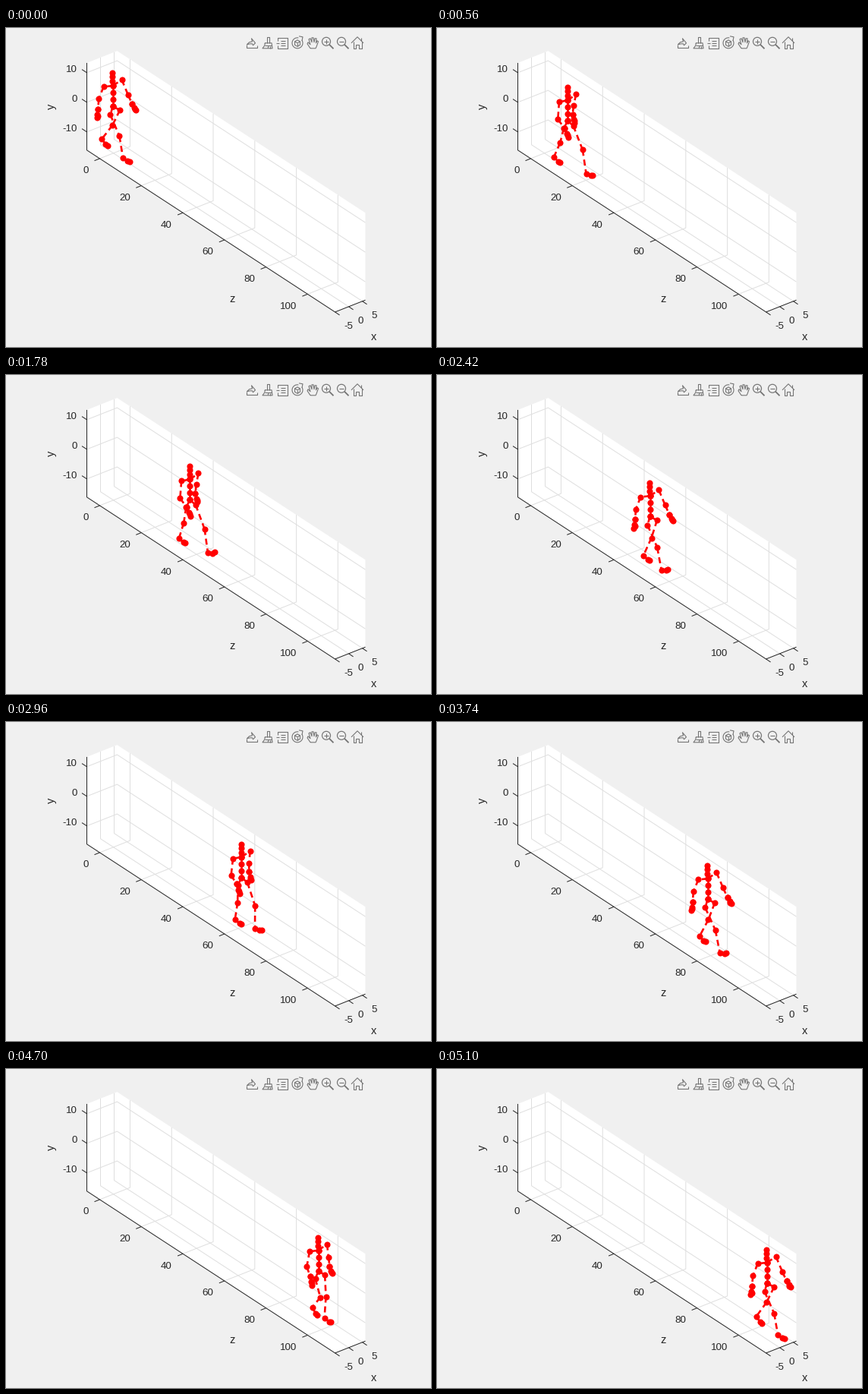
Animation, 560 px wide and 420 px high, one loop 5.12 s. Source, as a matplotlib script:

```python
import numpy as np
import matplotlib.pyplot as plt
from matplotlib.animation import FuncAnimation
from matplotlib.collections import LineCollection
from matplotlib.patches import Circle, Polygon

FRAMES, INTERVAL, STRIDE = 256, 20, 64
PX = 72 / 70  # points per pixel
INK, ICON = "#262626", "#757575"

plt.rcParams["font.family"] = "Liberation Sans"
fig = plt.figure(figsize=(8, 6), dpi=70, facecolor="#f0f0f0")
ax = fig.add_axes([0, 0, 1, 1])
ax.set_xlim(0.5, 560.5)
ax.set_ylim(420.2, 0.2)
ax.axis("off")


# ---------- 3-D box in screen space ----------
Y_MIN, Y_MAX = -16.15, 13.3
X_MIN, X_MAX = -5, 6.1
Z_MIN, Z_MAX = -6.2, 113.2


def project(x, y, z):
    return (142 + 3.6 * x + 2.739 * z, 102 - 1.42 * x - 3.9 * y + 1.785 * z)


def segments(segs, color, width):
    ax.add_collection(LineCollection(segs, colors=color, linewidths=width * PX))


def label(x, y, text, size=13.33, **kw):
    ax.text(x, y, text, fontsize=size * PX, color=INK, va="baseline", **kw)


outline = [(X_MIN, Y_MAX, Z_MIN), (X_MAX, Y_MAX, Z_MIN), (X_MAX, Y_MAX, Z_MAX),
           (X_MAX, Y_MIN, Z_MAX), (X_MIN, Y_MIN, Z_MAX), (X_MIN, Y_MIN, Z_MIN)]
ax.add_patch(Polygon([project(*p) for p in outline], fc="white", ec="none"))

grid, ticks = [], []


def tick(point, dx, dy):
    ticks.append([point, (point[0] + dx, point[1] + dy)])


for z in range(0, 101, 20):
    a = project(X_MIN, Y_MIN, z)
    grid.append([a, project(X_MAX, Y_MIN, z), project(X_MAX, Y_MAX, z)])
    tick(a, -7, 2.8)
    label(a[0] - 14.5, a[1] + 19.5, str(z), ha="right")
for y in (-10, 0, 10):
    a = project(X_MIN, y, Z_MIN)
    grid.append([a, project(X_MAX, y, Z_MIN), project(X_MAX, y, Z_MAX)])
    tick(a, -6.5, -4.2)
    label(a[0] - 13, a[1] - 1.3, str(y), ha="right")
for x in (-5, 0, 5):
    a = project(x, Y_MIN, Z_MAX)
    if x > X_MIN:
        grid.append([project(x, Y_MAX, Z_MIN), project(x, Y_MIN, Z_MIN), a])
    tick(a, 6, 4)
    label(a[0] + 11.5, a[1] + 22, str(x), ha="left")

segments(grid, "#dfdfdf", 1)
edges = [[project(X_MIN, Y_MAX, Z_MIN), project(X_MIN, Y_MIN, Z_MIN),
          project(X_MIN, Y_MIN, Z_MAX), project(X_MAX, Y_MIN, Z_MAX)]]
segments(edges + ticks, INK, 1)

label(298.5, 361, "z", 14.67, ha="center")
label(485.5, 411, "x", 14.67, ha="center")
label(64, 103.5, "y", 14.67, ha="center", rotation=90, rotation_mode="anchor")


# ---------- toolbar ----------
def stroke(cx, *paths, width=1.1):
    segments([[(cx + x, 20 + y) for x, y in p] for p in paths], ICON, width)


stroke(324, [(-7, 2), (-7, 6), (7, 6), (7, 3)],
       [(-6, 2), (-3, -1), (1, -2), (0, -6), (5, 0), (2, 3), (1, 1), (-2, 1), (-6, 2)])
stroke(345.5, [(-1, 0), (-1, -8), (2, -8), (2, 0)],
       [(-4, 0), (5, 0), (6, 7), (-7, 7), (-4, 3), (-4, 0)],
       [(-4, 3), (5, 3)], [(0, 7), (1, 4)], [(3, 7), (3, 4)])
stroke(364.5, [(-6, -3), (-6, -7), (7, -7), (7, 7), (-6, 7), (-6, 3)], [(-8, 0), (-4, 0)],
       *([(-2, y), (4, y)] for y in (-3, 0, 3)))
turn = np.linspace(-0.6, 4.9, 30)
stroke(384.5, list(zip(7 * np.cos(turn), 7 * np.sin(turn))),
       [(2, -9), (7, -8), (6, -3)],
       [(0, -4), (3.5, -2), (3.5, 2.5), (0, 4.5), (-3.5, 2.5), (-3.5, -2), (0, -4)],
       [(-3.5, -2), (0, 0), (3.5, -2)], [(0, 0), (0, 4.5)])
stroke(404.5, [(-3, 7), (-7, 1), (-6, -1), (-3, 2), (-5, -5), (-3, -6), (-1, -1),
               (-1, -7), (1, -7), (2, -1), (3, -6), (5, -6), (4.5, 0), (6, -3),
               (7.5, -2), (5, 5), (4, 7), (-3, 7)])
for cx, plus in ((424.5, True), (444.5, False)):
    ax.add_patch(Circle((cx - 2, 18), 5.5, fc="none", ec=ICON, lw=1.2 * PX))
    stroke(cx, [(2, 2), (7.5, 7.5)], width=1.8)
    stroke(cx, [(-5, -2), (1, -2)])
    if plus:
        stroke(cx, [(-2, -5), (-2, 1)])
stroke(463.5, [(-8, 0), (0, -8), (8, 0)],
       [(-5.5, -2), (-5.5, 7), (-2, 7), (-2, 2), (2, 2), (2, 7), (5.5, 7), (5.5, -2)],
       [(5, -3), (5, -7)])


# ---------- walk cycle ----------
SPEED = np.array([1.153, 0.702])
SLOPE = SPEED[1] / SPEED[0]
step = np.arange(FRAMES)
turn = 2 * np.pi / STRIDE


def wave(peak, harmonic=1):
    return np.cos(harmonic * turn * (step - peak))


def bump(u, centre, width):
    d = (u - centre + STRIDE / 2) % STRIDE - STRIDE / 2
    return np.exp(-(d / width) ** 2)


def ease(t):
    t = np.clip(t, 0, 1)
    return t * t * (3 - 2 * t)


def points(x, y):
    return np.stack(np.broadcast_arrays(x, y), axis=-1)


track = np.array([141.5, 103]) + step[:, None] * SPEED
sway = -0.6 + 0.7 * wave(55)
bob = -1.1 + 1.4 * wave(1, 2) + 0.5 * wave(16)
root = track + points(sway, bob)


def leg(side):
    """Hip, knee, ankle, foot and toe; side is -1 (near) or 1 (far)."""
    u = (step + 17 + 16 * side) % STRIDE  # steps since the foot went flat
    twist = wave(58)
    hip = root + points(2.15 + 6.25 * side + 0.9 * twist, 8.1 - (2.4 + 0.7 * twist) * side)

    # The foot stays planted, then swings one stride ahead.
    x = 17.8 + 3.6 * side + SPEED[0] * (STRIDE * ease((u - 29.5) / 34.5) - u)
    y = 57.6 - 2.2 * side + 0.609 * x - 11 * bump(u, 40.5, 7)
    ankle = track + points(x, y)

    push, strike = bump(u, 39, 8), bump(u, 57, 5)
    pitch = push - strike
    foot = ankle + points(6 - 2.3 * push, 4.8 + 4.5 * pitch)
    toe = foot + points(2.7 - 0.6 * push, 0.8 + 2.4 * pitch)

    bend = points(1.6 + 7.5 * bump(u, 46, 7.5) + 2.2 * bump(u, 63, 8),
                  6 * bump(u, 42, 7))
    knee = (hip + ankle) / 2 + bend
    return np.stack([hip, knee, ankle, foot, toe], axis=1)


def arm(shoulder, elbow, wrist, tip):
    """Each joint is its middle position plus how far it swings."""
    swing = wave(60.5)[:, None]
    shoulder, elbow, wrist, tip = (
        root + np.array(j[:2]) + swing * np.array(j[2:])
        for j in (shoulder, elbow, wrist, tip))
    hand = wrist + 0.6 * (tip - wrist)
    thumb = hand + np.array([0.8, 2])
    return (np.stack([spine[:, 3], shoulder, elbow, wrist, hand, tip], axis=1),
            np.stack([wrist, thumb], axis=1))


heights = np.array([0, 9, 18, 27, 33, 39, 44])
spine = root[:, None] + np.stack([-0.5 * (heights > 27), -heights], axis=1)
chains = [
    spine,
    *(np.concatenate([spine[:, :1], leg(s)], axis=1) for s in (-1, 1)),
    *arm((-11.7, -25.4, -0.6, -0.4), (-15.8, -6, -3, -4),
         (-12, 6.7, -8, -2.8), (-10.5, 18.5, -11.5, -3.5)),
    *arm((11.4, -35, 0.3, 0), (14.2, -17.5, 6.2, 2.7),
         (16.3, -5.5, 9.8, 3), (19.8, 4, 11.2, 1.5)),
]
joints = np.concatenate(chains, axis=1)
bones = np.concatenate([np.stack([c[:, :-1], c[:, 1:]], axis=2) for c in chains], axis=1)

WIDTH = 2.6
limbs = LineCollection([], colors="red", linewidths=WIDTH * PX,
                       linestyles=[(0, (8 / WIDTH, 5 / WIDTH))], capstyle="butt", zorder=5)
ax.add_collection(limbs)
dots, = ax.plot([], [], "o", color="red", ms=8.1 * PX, mew=0, zorder=6)


def draw(i):
    limbs.set_segments(bones[i])
    dots.set_data(joints[i, :, 0], joints[i, :, 1])
    return limbs, dots


anim = FuncAnimation(fig, draw, frames=FRAMES, interval=INTERVAL, repeat=True)
plt.show()
```
